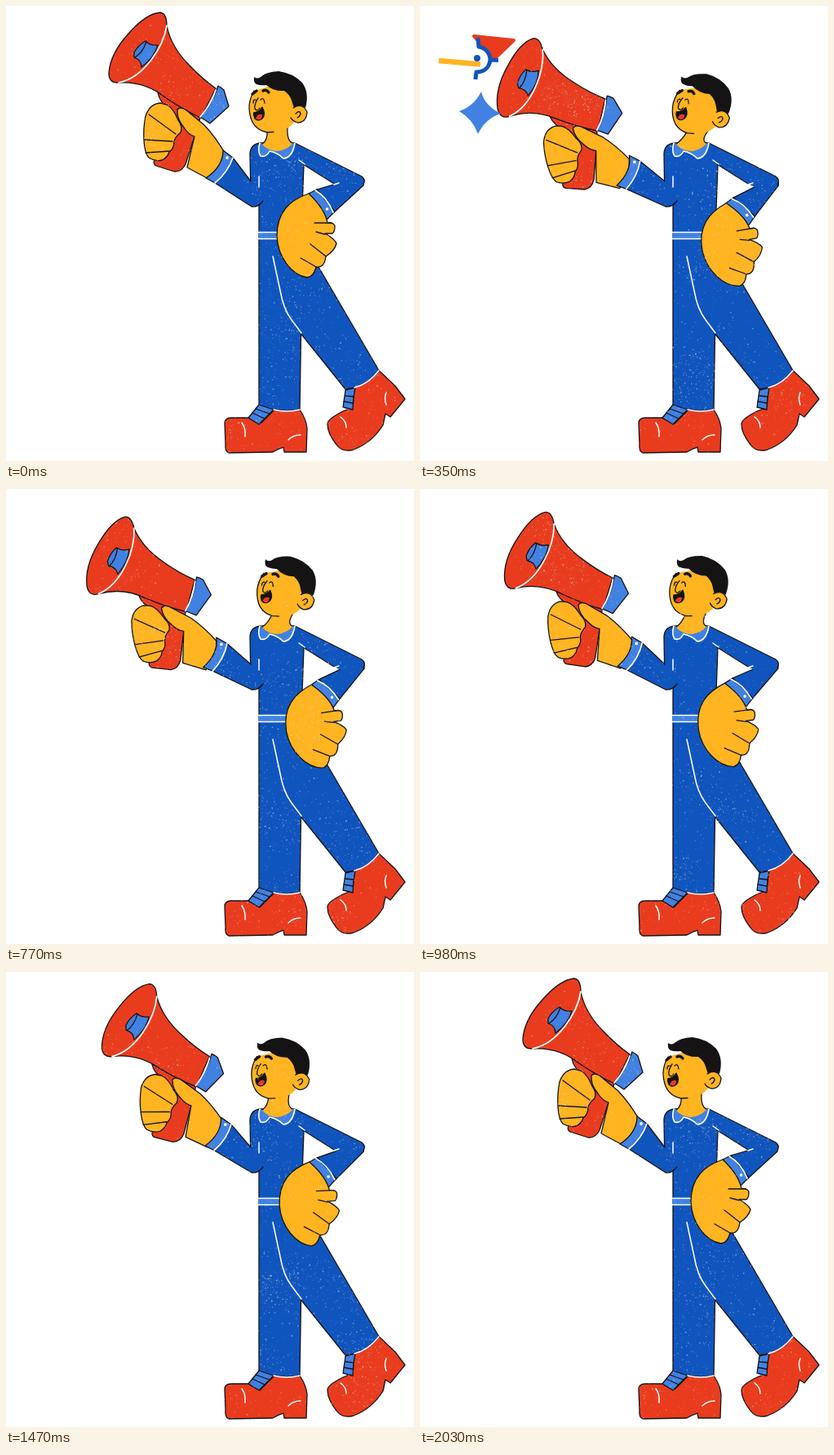
These frames come from a looping animation (500x558 px, 2100 ms). An HTML page with a canvas:

```html
<!DOCTYPE html>
<html lang="en">
<head>
<meta charset="utf-8">
<title>Megaphone man</title>
<style>
html, body { margin: 0; width: 100%; height: 100%; overflow: hidden; background: #fff; }
canvas { display: block; }
</style>
</head>
<body>
<canvas id="stage" width="500" height="558"></canvas>
<script>
const ctx = document.getElementById('stage').getContext('2d');
const RED = '#e93c1f', BLUE = '#1055be', SKY = '#4081e2', SKIN = '#ffb420', INK = '#151314', WHITE = '#fff';
const LOOP = 2100, STEP = 70, PEAK = 340, REST = 2030;
const NECK = [317, 213], HEAD_TILT = 0.13;
ctx.lineJoin = ctx.lineCap = 'round';

function fill(color, d) {
  ctx.fillStyle = color;
  ctx.fill(new Path2D(d));
}
function line(d, color = INK, width = 1.3) {
  ctx.strokeStyle = color;
  ctx.lineWidth = width;
  ctx.stroke(new Path2D(d));
}
function shape(color, d) {
  fill(color, d);
  line(d);
}
function dot(x, y, r, color) {
  ctx.fillStyle = color;
  ctx.beginPath();
  ctx.arc(x, y, r, 0, 7);
  ctx.fill();
}
function turned([x, y], angle, draw) {
  ctx.save();
  ctx.translate(x, y);
  ctx.rotate(angle);
  ctx.translate(-x, -y);
  draw();
  ctx.restore();
}
function turnPoint([px, py], angle, x, y) {
  const c = Math.cos(angle), s = Math.sin(angle);
  x -= px;
  y -= py;
  return `${px + x * c - y * s},${py + x * s + y * c}`;
}
function random(seed) {
  return () => {
    seed = seed + 0x6d2b79f5 | 0;
    let n = Math.imul(seed ^ seed >>> 15, 1 | seed);
    n = n + Math.imul(n ^ n >>> 7, 61 | n) ^ n;
    return ((n ^ n >>> 14) >>> 0) / 4294967296;
  };
}

// 0 is the upright pose, 1 the thrust forward
function pose(t) {
  const u = t < PEAK ? t / PEAK : (REST - t) / (REST - PEAK);
  return (1 - Math.cos(Math.PI * u)) / 2;
}

function drawBody() {
  shape(BLUE, 'M311,168 Q299,170 299,182 L300,240 L310,244 L310,491 Q328,499 360,496 L361.500,402 L416,470 Q444,466 457,447 L383,320 Q370,290 363,250 L365,194 L354,168Z');
  line('M327,307 L336,349 Q340,372 350,385 L362,401', WHITE, 1.5);

  shape(RED, 'M268,512 Q268,505 276,505 L297,505 L311,513 L329,495 Q344,498 360,495 Q368,507 369,518 L368,547 L341,547 L340,541 Q333,543 327,547 L273,548 Q268,546 269,537Z');
  shape(SKY, 'M310,489 L328,495 L310,513 L297,505Z');
  line('M306,494 L323,500 M302,499 L317,506');
  line('M328,495 Q344,499 360,495 M289,511 Q294,518 293,528 M346,532 Q352,526 361,526', WHITE, 1.5);

  shape(RED, 'M427,468 Q444,464 457,447 L477,466 L489,482 L471,504 L465,500 L462,514 Q448,536 426,544 Q412,548 405,538 Q394,524 394,513 Q393,507 413,497 L425,492Z');
  shape(SKY, 'M416,471 L428,468 Q425,481 425,495 L413,492Z');
  line('M416,478 L426,479 M414,485 L425,487');
  line('M427,468 Q444,464 457,447 M466,474 Q463,481 466,489 M410,504 Q417,509 417,517', WHITE, 1.5);

  fill(SKY, 'M309,277.500 H347 V285.500 H309Z');
  line('M309,277.500 H347 M309,285.500 H347', WHITE, 1.5);
}

function drawHipArm(p) {
  turned([439, 213], -0.178 * p, () => {
    shape(BLUE, 'M439,213 L438,220 L402,253 L381,225 L408,217Z');
    shape(SKY, 'M381,225 L371,230 L393,262 L403,252Z');
    line('M379,226 Q393,234 401,253', WHITE, 1.6);
    dot(393.5, 249, 1.8, WHITE);
    shape(SKIN, 'M371,230 C348,238 332,252 332,282 C333,308 350,330 369,333 Q377,332 380,320 Q390,322 392,307 Q403,300 405,291 Q402,285 391,279 L400,279 Q403,277 403,270 Q402,265 394,266 Q391,249 371,230Z');
    line('M378,266 L399,266 M380,277 L391,280 M373,292 L392,307 M361,309 L380,320');
  });
  fill(BLUE, 'M354,168 L436,209 Q441,213 438,219 L422,228 L404,219 L364,194 L350,185Z');
  line('M354,168 L436,209 Q441,213 438,219 M364,194 L402,218');
  line('M359,189 L366,194 M402,219 L408,217', WHITE, 1.5);
}

function drawHead(p) {
  const angle = HEAD_TILT * p;
  const left = turnPoint(NECK, angle, 320, 152), right = turnPoint(NECK, angle, 345, 149);
  fill(SKY, 'M311,168 Q308,178 312,184 Q319,186 323,178 Q333,180 340,187 Q351,186 354,168Z');
  line('M311,168 Q308,178 312,184 Q319,186 323,178 Q333,180 340,187 Q351,186 354,168', WHITE, 1.6);
  fill(SKIN, `M${left} Q321,165 314,170 Q322,178 333,178 Q343,177 351,169 Q344,165 ${right}Z`);
  line(`M${left} Q321,165 314,169 M351,168 Q344,165 ${right}`);

  turned(NECK, angle, () => {
    fill(SKIN, 'M304,104 Q298,114 298,125 Q299,151 320,155 Q341,157 353,143 L356,112 L335,95Z');
    line('M304,104 Q298,114 298,125 Q299,151 320,155 L328,154.500');
    fill(SKIN, 'M350,125 Q363,117 369,130 Q368,143 357,143 Q350,141 349,137Z');
    line('M352,125 Q363,118 369,130 Q368,143 357,143 Q351,141 349,137 M355,132 Q360,127 361,132 Q360,136 357,137');
    line('M309,113 Q304,120 305,126 Q308,130 311,125 M303,119 Q303,114 306,115 M312,115 Q316,111 317,119');
    shape(INK, 'M303.500,131 Q311,130 314,124 Q319,133 314,138 Q309,142 305,138 Q303,134 303.500,131Z');
    fill(RED, 'M306,138 Q308,132 314,133 Q314,139 310,139.500Z');
  });
}

function drawHair(p) {
  turned(NECK, HEAD_TILT * p, () => {
    fill(INK, 'M304,87 Q303,94 307,96 Q312,98 319,97 Q328,105 341,104 Q348,109 350,116 L353,125 Q358,120 367,125 Q372,106 363,94 Q351,82 334,80 Q318,81 312,87 Q308,90 304,87Z');
    line('M302,108 L307,104 M315,104 Q319,102 322,106', INK, 3.4);
  });
}

function drawMegaphone() {
  shape(RED, 'M186,106 L238,137 L231,160 L220,194 Q215,204 206,203 L184,196 Q179,193 183,187 L200,126 Q188,118 186,106Z');
  shape(RED, 'M138,94 Q126,95 126,82 Q128,58 150,34 Q172,9 189,8 Q197,9 197,24 Q202,50 225,73 Q240,89 257,101 L239,137 Q220,129 195,112 Q170,92 138,94Z');
  shape(SKY, 'M157,57 Q162,48 171,43 Q177,49 186,48 Q182,63 166,75 Q166,66 157,63Z');
  line('M158,63 Q167,58 172,44');
  line('M197,24 C193,50 169,88 138,94', WHITE, 1.7);
  shape(SKY, 'M260,98 Q264,100 267,103 L273,123 L250,144 L238,136 Q253,119 258,103Z');
  line('M257,103 Q252,120 238,136', WHITE, 1.7);

  shape(SKIN, 'M189,119 Q176,120 171,135 Q168,150 169,165 Q170,181 175,186 Q183,191 191,189 Q198,186 200,179 Q206,175 206,166 Q207,161 214,155 Q217,148 211,140 Q205,125 197,121Z');
  line('M175,133 L208,157 M170,164 L204,166 M171,180 L200,178');
  shape(SKIN, 'M210,127 Q213,123 220,127 L243,146 Q257,161 268,180 Q265,198 248,212 L222,198 L231,160 Q224,158 218,149 Q209,138 210,127Z');
}

function drawRaisedArm(p) {
  const elbow = [300, 240], bend = -0.16 * p;
  const top = turnPoint(elbow, bend, 278, 186), bottom = turnPoint(elbow, bend, 256, 217);
  turned([295, 232], -0.24 * p, drawMegaphone);
  fill(BLUE, `M${top} L300,215 L314,220 L315,239 Q309,247 301,246 L${bottom}Z`);
  line(`M${top} L300,215 M315,239 Q309,247 301,246 L${bottom}`);
  line('M310,209 V222', WHITE, 1.5);
  turned(elbow, bend, () => {
    shape(SKY, 'M266,177 L278,186 Q272,204 256,217 L245,211 Q266,197 266,177Z');
    line('M278,186 Q272,204 256,217', WHITE, 1.7);
    dot(271, 186, 1.9, WHITE);
  });
}

// Worn-print specks, kept to the painted area
function drawGrain(seed) {
  const rnd = random(seed * 977 + 5);
  ctx.globalCompositeOperation = 'source-atop';
  for (let i = 0; i < 120; i++) {
    const cx = 95 + rnd() * 395, cy = rnd() * 550, spread = 20 + rnd() * 70;
    for (let j = 0; j < 50; j++) {
      const size = 0.5 + rnd() * rnd() * 1.3;
      ctx.fillStyle = `rgba(215,225,205,${0.25 + rnd() * 0.4})`;
      ctx.fillRect(cx + (rnd() + rnd() - 1) * spread, cy + (rnd() + rnd() - 1) * spread, size, size);
    }
  }
  ctx.globalCompositeOperation = 'source-over';
}

// Each burst part passes from `from` through `via`
const burst = [
  { from: [118, 112], via: [90, 47], draw() {
    fill(RED, 'M-25,-12 L26,-6 L2,19Z');
    line('M-24,-10 L25,-5 L1,18Z', RED, 4);
  } },
  { from: [86, 78], via: [48.5, 69.5], draw() {
    ctx.lineCap = 'butt';
    line('M-25.500,-2.500 L25.500,2', SKIN, 6.5);
    ctx.lineCap = 'round';
  } },
  { from: [115, 88], via: [70, 65], draw() {
    ctx.lineCap = 'butt';
    line('M1,-26 L2,-15 C10,-14 16,-7 16,1 C15,10 9,16 -1,16 L-2,25 M16,1 L26,1.500', BLUE, 5);
    ctx.lineCap = 'round';
    dot(0, -1, 4, BLUE);
  } },
  { from: [112, 108], via: [73, 131], draw() {
    fill(SKY, 'M2,-26 Q6,-9 26,1 Q7,7 -2,26 Q-8,8 -25,-2 Q-7,-8 2,-26Z');
  } }
];

function drawBurst(t) {
  if (t <= 210 || t > 560) return;
  const u = 1 - ((560 - t) / 350) ** 2;
  for (const { from, via, draw } of burst) {
    const [x, y] = from.map((a, i) => a + (via[i] - a) * u / 0.64);
    const scale = Math.sin(2.45 * u);
    ctx.save();
    ctx.translate(x, y);
    ctx.scale(scale, scale);
    draw();
    ctx.restore();
  }
}

let shown = -1;
function frame() {
  const index = Math.floor(performance.now() % LOOP / STEP);
  if (index !== shown) {
    shown = index;
    const t = index * STEP, p = pose(t);
    ctx.clearRect(0, 0, 500, 558);
    drawBody();
    drawHipArm(p);
    drawHead(p);
    drawRaisedArm(p);
    drawGrain(index % 29);
    drawHair(p);
    drawBurst(t);
  }
  requestAnimationFrame(frame);
}
frame();
</script>
</body>
</html>
```
